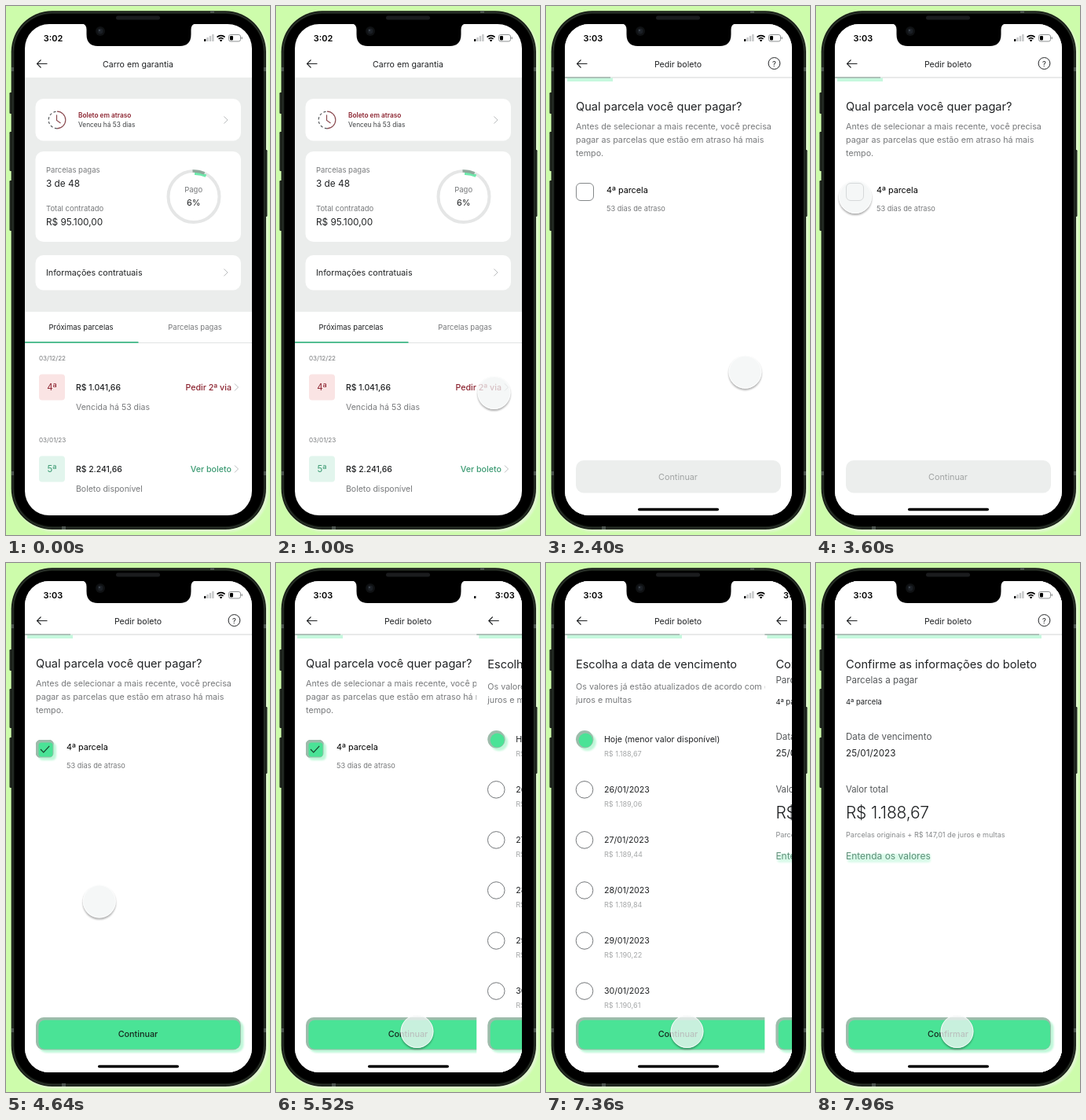
Recreate the animation shown at these times as an HTML page. Size 336 by 673 pixels, loop 8 s.

```html
<!DOCTYPE html>
<html lang="pt-BR">
<head>
<meta charset="utf-8">
<title>Pedir boleto</title>
<style>
  html, body { margin: 0; width: 100%; height: 100%; overflow: hidden; background: #cdfcab; }
  svg { display: block; width: 100%; height: 100%; }
  text { font-family: Inter, "Open Sans", sans-serif; }
</style>
</head>
<body>
<svg id="stage" viewBox="0 0 336 673" xmlns="http://www.w3.org/2000/svg"></svg>
<script>
const LOOP = 8000, LEFT = 24, WIDTH = 289;
const INK = '#1f2123', GREY = '#77797b', PALE = '#a6a8a9', RED = '#8c2430', GREEN = '#4ae396', LEAF = '#3b9a72';

// y is the visual middle of the line
const text = (str, x, y, size, fill = INK, weight = 400, anchor = 'start', extra = '') =>
  `<text x="${x}" y="${y + size * 0.36}" font-size="${size}" fill="${fill}" font-weight="${weight}" text-anchor="${anchor}" ${extra}>${str}</text>`;
const rect = (x, y, w, h, r, fill, extra = '') =>
  `<rect x="${x}" y="${y}" width="${w}" height="${h}" rx="${r}" fill="${fill}" ${extra}/>`;
const line = (d, stroke, width = 1, extra = '') =>
  `<path d="${d}" fill="none" stroke="${stroke}" stroke-width="${width}" ${extra}/>`;
const chevron = (x, y) => line(`M${x} ${y - 4.5}l4.5 4.5l-4.5 4.5`, '#b9bcbd', 1);

// Green box with a muted rim and a soft mint fringe at the lower right
const greenBox = (x, y, w, h, r) =>
  rect(x + 3.5, y + 3.5, w, h, r, '#bff8d9', 'filter="url(#soft)"') +
  rect(x, y, w, h, r, '#9dbcab') +
  rect(x + 3.5, y + 3.5, w - 4.5, h - 4.5, r - 2, GREEN, 'filter="url(#blend)"');

function statusBar(time) {
  let s = text(time, 60, 41, 11, '#000', 600, 'middle');
  for (let i = 0; i < 4; i++) {
    const h = 3 + i * 2;
    s += rect(252 + i * 3.4, 45 - h, 2.4, h, 0.6, i ? '#c4c6c7' : '#111');
  }
  s += line('M268.6 39.6a7.4 7.4 0 0 1 10 0', '#000', 1.8);
  s += line('M270.6 42a4.5 4.5 0 0 1 6 0', '#000', 1.6);
  s += '<path d="M273.6 45.6l-1.8-2a2.6 2.6 0 0 1 3.6 0z"/>';
  s += rect(283.5, 36.5, 15, 8.5, 2.4, 'none', 'stroke="#8d9091"');
  s += rect(285, 38, 4, 5.5, 1.2, '#000') + rect(299.6, 39.2, 1.3, 3, 0.6, '#8d9091');
  return s;
}

const header = (time, title) =>
  rect(LEFT, 20, WIDTH, 632, 0, '#fff') + statusBar(time) +
  line('M52.5 73.5H39.5M44.5 68.5l-5 5l5 5', INK, 1.1) +
  text(title, 168, 74, 10.6, INK, 400, 'middle');

const stepHeader = progress =>
  header('3:03', 'Pedir boleto') +
  `<circle cx="290.5" cy="73" r="7.4" fill="none" stroke="${INK}"/>` +
  text('?', 290.5, 73.3, 9.5, INK, 400, 'middle') +
  rect(LEFT, 90.5, WIDTH, 1, 0, '#d3d6d6') +
  rect(LEFT + 3, 91.5, progress, 4.5, 0, '#c6f8de', 'filter="url(#blend)"') +
  rect(LEFT, 90.4, progress, 1.2, 0, '#8fa69c') +
  rect(117, 638.8, 103, 3.4, 1.7, '#000');

const greenButton = label =>
  greenBox(38, 578, 261, 41.5, 10) + text(label, 168, 599, 10.8, '#15281e', 500, 'middle');

const paragraph = (rows, y) =>
  rows.map((row, i) => text(row, 38, y + i * 16.7, 10.75, GREY)).join('');

function instalment(y, date, label, tint, color, value, note, action) {
  return text(date, 42, y - 37, 8.1, GREY) +
    rect(42, y - 16.5, 33, 33, 4, tint) + text(label, 58.5, y, 11.4, color, 400, 'middle') +
    text(value, 89, y, 10.4, INK, 500) + text(note, 89, y + 25.5, 10.5, GREY) +
    text(action, 287, y, 10.7, color, 500, 'end') + chevron(291, y);
}

function contractScreen() {
  let s = header('3:02', 'Carro em garantia') + rect(LEFT, 91, WIDTH, 298, 0, '#ebedec');
  for (const [y, h] of [[118, 53.5], [185, 115], [317, 44.5]]) s += rect(37.5, y, 261.5, h, 10, '#fff');
  s += line('M65 134.2a10.8 10.8 0 0 1 0 21.6', '#8a4a50', 1.2) +
    line('M65 155.8a10.8 10.8 0 0 1 0 -21.6', '#55585a', 1.2, 'stroke-dasharray="3.2 2.6"') +
    line('M64.5 138.5V145.5L69.5 149', '#8a4a50', 1.2);
  s += text('Boleto em atraso', 92, 139, 8.3, RED, 600) + text('Venceu há 53 dias', 92, 151, 8.3, '#3c3f41');
  s += chevron(277.5, 145) + chevron(277.5, 339);
  s += text('Parcelas pagas', 51, 209, 9.5, GREY) + text('3 de 48', 51, 226, 11.8) +
    text('Total contratado', 51, 258, 9.5, GREY) + text('R$ 95.100,00', 51, 275, 11.8);
  s += '<circle cx="239" cy="242.5" r="32.5" fill="none" stroke="#e5e6e6" stroke-width="4"/>' +
    line('M240 213.2a32.5 32.5 0 0 1 14.5 3', '#5fe7a3', 3.6, 'opacity=".9"') +
    line('M237.5 210a32.5 32.5 0 0 1 15 2.8', '#8fa89b', 3.6);
  s += text('Pago', 238.7, 234, 9.5, GREY, 400, 'middle') + text('6%', 238.7, 250, 11, INK, 400, 'middle');
  s += text('Informações contratuais', 51, 339, 10.7);
  s += text('Próximas parcelas', 95.5, 409, 9.5, INK, 400, 'middle') +
    text('Parcelas pagas', 240.5, 409, 9.5, GREY, 400, 'middle') +
    rect(168, 428, 145, 1, 0, '#e1e3e3') + rect(LEFT, 427, 144.5, 1.8, 0, '#41b787');
  s += instalment(485, '03/12/22', '4ª', '#fae4e4', RED, 'R$ 1.041,66', 'Vencida há 53 dias', 'Pedir 2ª via');
  s += instalment(589, '03/01/23', '5ª', '#e2f5ed', LEAF, 'R$ 2.241,66', 'Boleto disponível', 'Ver boleto');
  return s;
}

function parcelScreen() {
  return stepHeader(58) + text('Qual parcela você quer pagar?', 38, 128, 14.6) +
    paragraph(['Antes de selecionar a mais recente, você precisa', 'pagar as parcelas que estão em atraso há mais', 'tempo.'], 153.5) +
    text('4ª parcela', 77, 234, 10.8, '#000') + text('53 dias de atraso', 77, 257.5, 9.2, GREY) +
    rect(38.5, 225.5, 22, 22, 5.5, '#fff', 'stroke="#85888a"') +
    rect(38, 578, 261, 41.5, 10, '#eceeed') + text('Continuar', 168, 599, 10.8, '#a0a3a3', 400, 'middle') +
    `<g id="checked">${greenBox(38, 225, 22.5, 22.5, 5.5)}${line('M44 237l3.8 3.8l7.4-8', '#16402b', 1.2)}${greenButton('Continuar')}</g>`;
}

function dateScreen() {
  const values = ['1.188,67', '1.189,06', '1.189,44', '1.189,84', '1.190,22', '1.190,61'];
  const rows = values.map((value, i) => {
    const y = 224.3 + i * 64.05;
    const radio = i
      ? `<circle cx="49" cy="${y}" r="10.8" fill="#fff" stroke="#74777a"/>`
      : greenBox(38, y - 11.2, 22.4, 22.4, 11.2);
    return radio + text(i ? `${25 + i}/01/2023` : 'Hoje (menor valor disponível)', 74, y, 10.6) +
      text('R$ ' + value, 74, y + 18, 9.1, PALE);
  });
  return stepHeader(146) + text('Escolha a data de vencimento', 38, 128.5, 14.5) +
    paragraph(['Os valores já estão atualizados de acordo com os', 'juros e multas'], 157.5) +
    rows.join('') + greenButton('Continuar');
}

function confirmScreen() {
  return stepHeader(260) + text('Confirme as informações do boleto', 38, 128.5, 14.6) +
    text('Parcelas a pagar', 38, 149, 11.6, '#55585a') + text('4ª parcela', 38, 177, 9.4) +
    text('Data de vencimento', 38, 221, 11.6, '#55585a') + text('25/01/2023', 38, 242, 11.7) +
    text('Valor total', 38, 288, 11.3, '#55585a') +
    text('R$ 1.188,67', 38, 317.3, 21, INK, 300, 'start', 'letter-spacing="-.2"') +
    text('Parcelas originais + R$ 147,01 de juros e multas', 38, 345.5, 9.1, '#85888a') +
    rect(40, 370, 106, 11, 3, '#d9fae9', 'filter="url(#soft)"') +
    text('Entenda os valores', 38, 373, 12, '#5f8f79') +
    greenButton('Confirmar');
}

function phone(screens) {
  const bars = [[4.5, 110, 27], [4.5, 160, 50], [4.5, 222, 64], [328.5, 183, 85]];
  const bands = [[7, 78, 3, 5], [7, 592, 3, 5], [328, 78, 3, 5], [328, 592, 3, 5], [260, 6, 5, 3], [71, 662, 5, 4]];
  return rect(9, 9, 325, 660, 52, '#e0f8cf', 'filter="url(#soft)"') +
    bars.map(([x, y, h]) => rect(x, y, 4, h, 1.2, '#232a22')).join('') +
    rect(6.7, 6.3, 324.3, 659.7, 52, '#171d15') +
    rect(8.8, 8.4, 320.4, 655.6, 50, 'none', 'stroke="#363c38" stroke-width=".9"') +
    bands.map(([x, y, w, h]) => rect(x, y, w, h, 0, '#4b534e')).join('') +
    rect(10.5, 10, 317, 652, 48, '#000') +
    `<g clip-path="url(#glass)">${screens.map((s, i) => `<g id="screen${i}">${s}</g>`).join('')}</g>` +
    '<path d="M96 22Q102.500 23 102.500 30V36Q102.500 51 117 51H221Q235.500 51 235.500 36V30Q235.500 23 242 22Z"/>' +
    rect(140, 12.5, 56, 5, 2.5, '#1b1c1e') +
    '<circle cx="120" cy="32" r="6" fill="#0f1113"/><circle cx="120" cy="32" r="3.4" fill="#1b1f25"/><circle cx="119" cy="31" r="1.2" fill="#3c434b"/>';
}

document.getElementById('stage').innerHTML =
  `<defs>
    <clipPath id="glass"><rect x="${LEFT}" y="23" width="${WIDTH}" height="625" rx="31"/></clipPath>
    <filter id="soft" x="-20%" y="-20%" width="140%" height="140%"><feGaussianBlur stdDeviation="1"/></filter>
    <filter id="blend" x="-20%" y="-20%" width="140%" height="140%"><feGaussianBlur stdDeviation=".7"/></filter>
    <filter id="shade" x="-30%" y="-30%" width="160%" height="160%"><feGaussianBlur stdDeviation="1.3"/></filter>
    <mask id="outside" maskUnits="userSpaceOnUse" x="-30" y="-30" width="60" height="60">
      <rect x="-30" y="-30" width="60" height="60" fill="#fff"/><circle r="20.800" fill="#000"/>
    </mask>
  </defs>` + rect(0, 0, 336, 673, 0, '#cdfcab') +
  phone([contractScreen(), parcelScreen(), dateScreen(), confirmScreen()]) +
  `<g id="touch">
    <g mask="url(#outside)"><circle cy="2" r="21" fill="#000" opacity=".32" filter="url(#shade)"/></g>
    <circle r="21" fill="#f2f4f4" opacity=".75"/>
    <circle r="20.500" fill="none" stroke="#fff" opacity=".75"/>
  </g>`;

const byId = id => document.getElementById(id);
const touch = byId('touch'), checked = byId('checked');
const screens = [0, 1, 2, 3].map(i => byId('screen' + i));

const slides = [[1, 1214, 400], [2, 5402, 400], [3, 7270, 400]];
const moves = [[40, 960, 277.5, 492], [2120, 940, 50, 243], [4160, 940, 179.5, 596]];

const span = (t, start, length) => Math.min(1, Math.max(0, (t - start) / length));
const sine = p => (1 - Math.cos(Math.PI * p)) / 2;
const cubic = p => p < 0.5 ? 4 * p ** 3 : 1 - (2 - 2 * p) ** 3 / 2;

function draw(t) {
  for (const [i, start, length] of slides) {
    const x = WIDTH * (1 - sine(span(t, start, length)));
    screens[i].setAttribute('transform', `translate(${x} 0)`);
    screens[i].setAttribute('visibility', t > start ? 'visible' : 'hidden');
  }
  checked.setAttribute('opacity', span(t, 3620, 100));

  let x = 364, y = 560;
  for (const [start, length, toX, toY] of moves) {
    const p = cubic(span(t, start, length));
    x += (toX - x) * p;
    y += (toY - y) * p;
  }
  touch.setAttribute('transform', `translate(${x} ${y})`);
}

let origin = null;
function tick(now) {
  if (origin === null) origin = now;
  draw((now - origin) % LOOP);
  requestAnimationFrame(tick);
}
draw(0);
requestAnimationFrame(tick);
</script>
</body>
</html>
```
